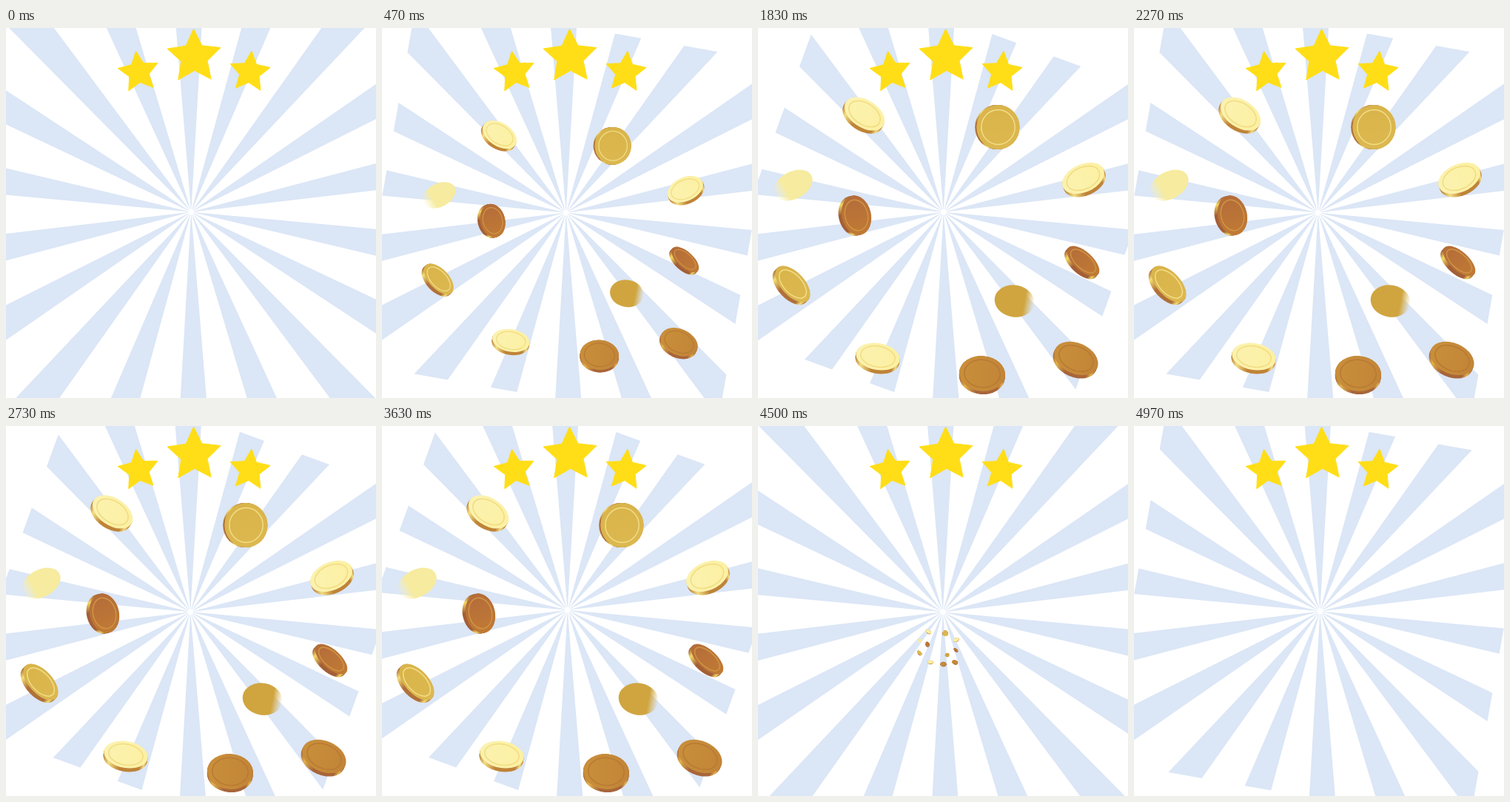
An HTML page with a canvas that plays this animation: 500 by 500 pixels, repeating every 5010 ms.

```html
<!DOCTYPE html>
<html lang="en">
<head>
<meta charset="utf-8">
<title>Stars and coins</title>
<style>
  html, body { margin: 0; width: 100%; height: 100%; overflow: hidden; background: #fff; }
  canvas { display: block; width: 500px; height: 500px; }
</style>
</head>
<body>
<canvas id="stage" width="500" height="500"></canvas>
<script>
const ctx = document.getElementById('stage').getContext('2d');
const LOOP = 5010;
const LAST = 149;
const DEG = Math.PI / 180;

// Each coin: centre x, y, tilt of the long axis, height / width
const kinds = [
  { face: ['#fbf2b0', '#fcf0a2'], edge: '#bf8438', glow: '#f3dd84', ring: '#f1dc80', size: 30,
    coins: [[144, 116, 33, 0.62], [439.5, 203, -24, 0.63], [162, 444, 10, 0.6]] },
  { face: ['#d9b44a', '#dcb850'], edge: '#b0703a', glow: '#f3de78', ring: '#f2dd86', size: 30,
    coins: [[324.5, 134, 90, 0.97], [47, 346, 47, 0.53]] },
  { face: ['#c98f3a', '#c28538'], edge: '#a8653a', glow: '#e0b04a', ring: '#b87a34', size: 31,
    coins: [[303, 467, 5, 0.77], [430, 446.5, 24, 0.67]] },
  { face: ['#b46c3a', '#c07a34'], edge: '#a35f36', glow: '#f3d864', ring: '#cf9444', size: 27,
    coins: [[133, 253, 76, 0.73], [439.5, 315, 42, 0.47]] },
  { face: ['#f8f0b000', '#f6eb9f'], soft: 0.3, size: 28, coins: [[47.5, 212.5, -28, 0.66]] },
  { face: ['#d0a540', '#d6b04c00'], soft: 0.75, size: 27, coins: [[346.5, 369, 10, 0.8]] }
];

function frameAt(ms) {
  const part = ms % 100;
  const n = 3 * Math.floor(ms / 100) + (part >= 30) + (part >= 70);
  return Math.min(n, LAST);
}

function easeOut(from, t) {
  const p = Math.min(1, Math.max(0, t - from));
  return 1 - (1 - p) ** 3;
}

function drawRays(turn) {
  ctx.save();
  ctx.translate(250, 250);
  ctx.rotate(turn * DEG);
  ctx.beginPath();
  ctx.rect(-250, -250, 500, 500);
  ctx.clip();
  ctx.translate(0.2, -1.4);
  ctx.fillStyle = '#dbe6f6';
  for (let i = 0; i < 18; i++) {
    const a = (89.3 + i * 20) * DEG;
    ctx.beginPath();
    ctx.arc(0, 0, 420, a - 4 * DEG, a + 4 * DEG);
    ctx.arc(0, 0, 4, a + 4 * DEG, a - 4 * DEG, true);
    ctx.fill();
  }
  ctx.restore();
}

function drawStar(side) {
  const off = Math.abs(side);
  const radius = 37.8 - 9.3 * off;
  ctx.beginPath();
  for (let i = 0; i < 10; i++) {
    const r = i % 2 ? radius * 0.49 : radius;
    const a = (side * 6.5 - 91.2 + i * 36) * DEG;
    ctx.lineTo(254.3 + 75 * side + r * Math.cos(a), 39 + 20.7 * off + r * Math.sin(a));
  }
  ctx.closePath();
  ctx.fillStyle = ctx.strokeStyle = '#ffde17';
  ctx.lineWidth = 1;
  ctx.fill();
  ctx.stroke();
}

function blend(r, stops) {
  const g = ctx.createLinearGradient(-r, 0, r, 0);
  for (const [at, colour] of stops) g.addColorStop(at, colour);
  return g;
}

function oval(y, rx, ry) {
  ctx.beginPath();
  ctx.ellipse(0, y, rx, ry, 0, 0, 2 * Math.PI);
}

function drawCoin([x, y, tilt, squash], { face, edge, glow, ring, soft, size }) {
  const ry = size * squash;
  ctx.save();
  ctx.translate(x, y);
  ctx.rotate(tilt * DEG);
  if (edge) {
    // The flatter a coin lies, the more of its edge shows
    const depth = 1 + 5 * Math.sqrt(1 - squash * squash);
    ctx.fillStyle = blend(size, [[0, edge], [0.15, glow], [0.4, edge], [0.85, edge], [0.94, glow], [1, edge]]);
    for (let d = depth; d > 0; d--) {
      oval(d, size, ry);
      ctx.fill();
    }
  }
  const [near, far] = face;
  const stops = [[0, near], [1, far]];
  if (soft) stops.splice(1, 0, [soft, soft < 0.5 ? far : near]);
  ctx.fillStyle = blend(size, stops);
  oval(0, size, ry);
  ctx.fill();
  if (ring) {
    ctx.strokeStyle = ring;
    ctx.lineWidth = 1.5;
    oval(0, size * 0.78, ry * 0.78);
    ctx.stroke();
  }
  ctx.restore();
}

function drawCoins(scale) {
  if (scale < 0.002) return;
  ctx.save();
  ctx.translate(243, 301);
  ctx.scale(scale, scale);
  ctx.translate(-243, -301);
  for (const kind of kinds) {
    for (const coin of kind.coins) drawCoin(coin, kind);
  }
  ctx.restore();
}

function draw(ms) {
  const n = frameAt(ms);
  const t = n / 30;
  ctx.fillStyle = '#fff';
  ctx.fillRect(0, 0, 500, 500);
  drawRays(n * 20);
  drawCoins(easeOut(0, t) - easeOut(4, t));
  [-1, 0, 1].forEach(drawStar);
}

const start = performance.now();
function tick() {
  draw((performance.now() - start) % LOOP);
  requestAnimationFrame(tick);
}
tick();
</script>
</body>
</html>
```
